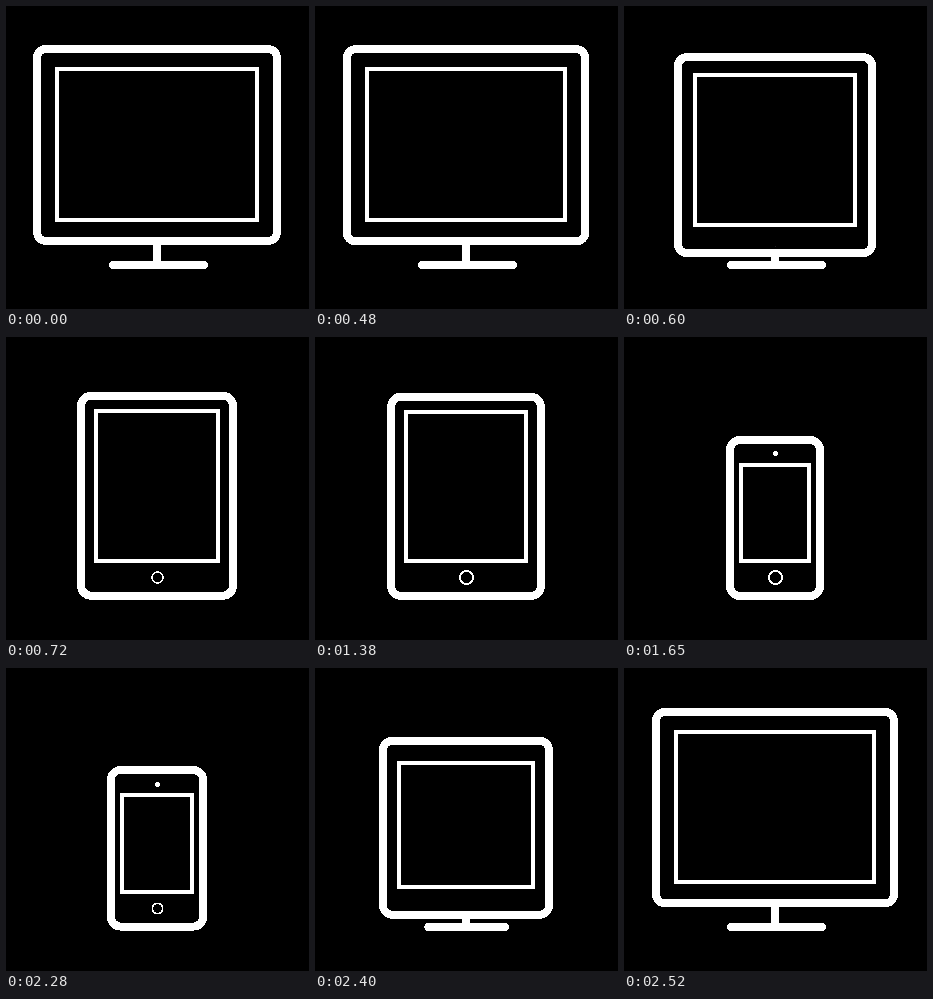
An HTML page without scripts for the animation above (2550 ms loop, 303x303 px).

```html
<!DOCTYPE html>
<html lang="en">
<head>
<meta charset="utf-8">
<title>Monitor, tablet, phone</title>
<style>
  html, body { margin: 0; width: 100%; height: 100%; overflow: hidden; background: #000; }
  svg { display: block; width: 100%; height: 100%; }

  .body, .screen, .base, .button, .camera {
    animation: 2550ms cubic-bezier(.5, 0, .5, 1) infinite;
  }
  .body, .screen, .button { fill: #000; stroke: #fff; }
  .body { stroke-width: 8px; animation-name: body; }
  .screen { stroke-width: 4px; animation-name: screen; }
  .base { animation-name: base; }
  .button { animation-name: button; }
  .camera { animation-name: camera; }

  /* monitor until 450 ms, tablet 750-1350, phone 1650-2250 */
  @keyframes body {
    0%, 17.647%, 100% { x: 31px; y: 43px; width: 240px; height: 192px; rx: 9px; }
    29.412%, 52.941% { x: 75.7px; y: 59px; width: 150.6px; height: 200px; rx: 10px; }
    64.706%, 88.235% { x: 106px; y: 103px; width: 90px; height: 156px; rx: 10px; }
  }
  @keyframes screen {
    0%, 17.647%, 100% { x: 51px; y: 63px; width: 200px; height: 151px; }
    29.412%, 52.941% { x: 91px; y: 74.3px; width: 120.6px; height: 149.7px; }
    64.706%, 88.235% { x: 117px; y: 128px; width: 68px; height: 96px; }
  }
  @keyframes base {
    0%, 52.941%, 100% { x: 103px; width: 99px; }
    64.706%, 88.235% { x: 116px; width: 70px; }
  }
  @keyframes button {
    0% { r: 0; stroke-width: 0; }
    23.529% { r: 0; stroke-width: 0; animation-timing-function: cubic-bezier(.16, .84, .44, 1); }
    36.471% { r: 6.5px; stroke-width: 2px; }
    88.235% { r: 6.5px; stroke-width: 2px; animation-timing-function: linear; }
    94.118%, 100% { r: 0; stroke-width: 0; }
  }
  @keyframes camera {
    0%, 52.941%, 100% { r: 0; }
    64.706%, 88.235% { r: 2.5px; }
  }
</style>
</head>
<body>
<svg viewBox="0 0 303 303" fill="#fff" shape-rendering="crispEdges">
  <rect class="base" y="255" height="8" rx="4"/>
  <rect x="147" y="237" width="8" height="22"/>
  <rect class="body"/>
  <circle class="camera" cx="151.5" cy="116.5"/>
  <rect class="screen"/>
  <circle class="button" cx="151.5" cy="240.5"/>
</svg>
</body>
</html>
```
